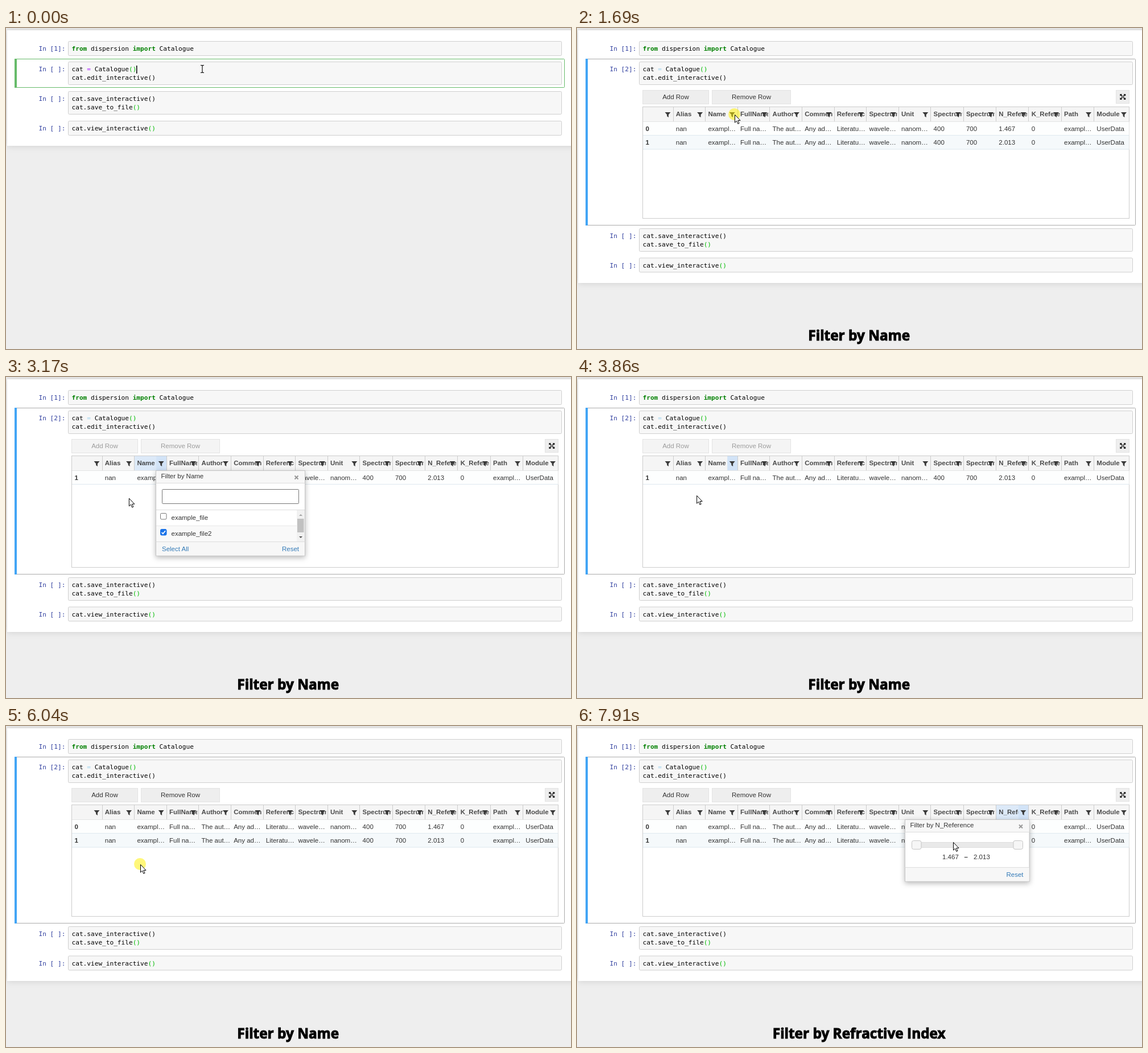
Write an HTML page that moves like this. It is 993 px wide and 564 px high and loops after 8 s.

```html
<!DOCTYPE html>
<html lang="en">
<head>
<meta charset="utf-8">
<title>Catalogue filter demo</title>
<style>
  html, body { margin: 0; width: 100%; height: 100%; overflow: hidden; background: #eee; }
  svg { display: block; }
  text { font: 11.5px "Liberation Sans", Arial, sans-serif; fill: #333; white-space: pre; }
  .b { font-weight: bold; }
  .code { font: 11.13px "DejaVu Sans Mono", monospace; fill: #000; }
  .prompt { fill: #303f9f; }
  .kw { fill: #008000; font-weight: bold; }
  .br { fill: #0b0; }
  .link { fill: #337ab7; }
  .mid { text-anchor: middle; }
  .title { font: bold 24.4px "Open Sans", "Noto Sans", sans-serif; fill: #000; stroke: #000; stroke-width: 1px; }
  .page { filter: drop-shadow(0 0 6px rgba(87, 87, 87, .22)); }
  .popup { filter: drop-shadow(0 3px 5px rgba(0, 0, 0, .28)); }
</style>
</head>
<body>
<svg id="stage" width="993" height="564" viewBox="0 0 993 564"></svg>
<script>
const LOOP = 8000;
const stage = document.getElementById('stage');

const rect = (x, y, w, h, fill, stroke = 'none', extra = '') =>
  `<rect x="${x}" y="${y}" width="${w}" height="${h}" fill="${fill}" stroke="${stroke}" ${extra}/>`;
const text = (x, y, str, cls = '', extra = '') => `<text x="${x}" y="${y}" class="${cls}" ${extra}>${str}</text>`;
const path = (d, fill, extra = '') => `<path d="${d}" fill="${fill}" ${extra}/>`;
const span = (cls, str) => `<tspan class="${cls}">${str}</tspan>`;
const at = (x, y, body) => `<g transform="translate(${x} ${y})">${body}</g>`;
const within = (t, a, b) => t >= a && t < b;
const ramp = (t, a, b) => Math.min(1, Math.max(0, (t - a) / (b - a)));

// Time, x and y of the pointer tip
const track = [
  [0, 345, 72], [450, 345, 72], [600, 356, 90], [720, 371, 108], [840, 368, 126],
  [1000, 345, 142], [1200, 290, 151], [1300, 277, 152], [2090, 277, 152],
  [2280, 278, 195], [2480, 278, 273], [2800, 278, 273], [3200, 211, 208],
  [3860, 210, 208], [3940, 219, 205], [4010, 219, 205], [4330, 282, 155],
  [4410, 277, 152], [4880, 277, 152], [5250, 274, 241], [5600, 274, 241],
  [5960, 236, 243], [6200, 236, 243], [6500, 380, 226], [7120, 785, 152],
  [7450, 785, 152], [7910, 661, 204], [LOOP, 661, 204]
];
const clicks = [[1690, 1850], [2480, 2710], [3200, 3350], [4560, 4720], [5410, 5570], [5960, 6120], [7200, 7360]];

function pointerAt(t) {
  const i = track.findIndex(k => k[0] > t);
  const [t0, x0, y0] = track[i - 1], [t1, x1, y1] = track[i];
  const p = ramp(t, t0, t1);
  return [x0 + (x1 - x0) * p, y0 + (y1 - y0) * p];
}

function cell(y, label, lines) {
  const h = lines.length * 15 + 11;
  return rect(109.5, y + .5, 867, h - 1, '#f7f7f7', '#cfcfcf', 'rx="2"') +
    text(57.5, y + 17, `In [${label}]:`, 'code prompt') +
    lines.map((line, i) => text(115.5, y + 17 + 15 * i, line, 'code')).join('');
}

// Grid columns
const names = ['', 'Alias', 'Name', 'FullName', 'Author', 'Comments', 'Reference', 'SpectrumType', 'Unit',
  'Spectrum_min', 'Spectrum_max', 'N_Reference', 'K_Reference', 'Path', 'Module'];
const values = ['', 'nan', 'exampl…', 'Full na…', 'The aut…', 'Any ad…', 'Literatu…', 'wavele…', 'nanom…',
  '400', '700', '', '0', 'exampl…', 'UserData'];
const NAME = 2, N_REF = 11;
const edge = i => i < 1 ? 115.5 : i > 14 ? 971 : 169.5 + 56.6 * (i - 1) + Math.max(0, i - 9) * .75;
const textX = i => edge(i) + (i ? 4.3 : 5);

function header(i, open, filtered) {
  const x = edge(i), end = edge(i + 1);
  const w = end - x - (open ? 19 : 3);
  return (open ? rect(x, 139, end - x, 25, '#dce9f8') : '') +
    `<svg x="${x}" y="139" width="${w}" height="25">${text(textX(i) - x, 16, names[i], 'b', 'fill-opacity=".88"')}</svg>` +
    (open || filtered ? rect(end - 18.5, 139, 18, 25, '#d2e3f7') : '') +
    at(end - 10, 152, path('M-5 -4H5L1.4 .2V5L-1.4 3V.2Z', '#3a3a3a')) +
    path(`M${Math.round(end) - .5} 139V164`, 'none', 'stroke="#ccc"');
}

function row(id, n, y, fill) {
  return rect(116, y, 854.5, 24.5, fill) + path(`M116 ${y + 24}H970.5`, 'none', 'stroke="#dfe9ef"') +
    text(textX(0), y + 16, id, 'b') +
    values.map((v, i) => text(textX(i), y + 16, i === N_REF ? n : v)).join('');
}

function button(x, w, label, off, hover) {
  return rect(x + .5, 109.5, w - 1, 24, hover ? '#dcdcdc' : off ? '#f4f4f4' : '#eee', hover ? '#cfcfcf' : '#e3e3e3') +
    text(x + w / 2, 125, label, 'mid', off ? 'fill-opacity=".45"' : '');
}

const arrows = [0, 90, 180, 270].map(a =>
  path('M-5 -5H-1.2L-2.3 -3.6L0 -1.3L-1.3 0L-3.6 -2.3L-5 -1.2Z', '#222', `transform="rotate(${a})"`)).join('');

function grid(t, open, hover) {
  const off = within(t, 2710, 5570), filtered = within(t, 2880, 5720);
  return button(115, 117, 'Add Row', off) + button(237, 139, 'Remove Row', off, hover) +
    rect(947.5, 109.5, 23, 23, '#eee', '#e3e3e3') + at(959.3, 121, arrows) +
    rect(115.5, 138.5, 855, 196, '#fff', '#ccc') + rect(116, 139, 854.5, 25, '#f5f5f5') +
    names.map((_, i) => header(i, i === open, i === NAME && filtered)).join('') +
    path('M116 164.5H970.5', 'none', 'stroke="#ccc"') +
    (filtered ? row(1, '2.013', 164.5, '#fdfefe')
      : row(0, '1.467', 164.5, '#fdfefe') + row(1, '2.013', 189, '#f5f9fb'));
}

function frame(x, w, h, title, foot) {
  const line = y => path(`M${x} ${y}.5h${w}`, 'none', 'stroke="#ddd"');
  return rect(x, 164.5, w, h, '#fff', '#c4c4c4', 'class="popup"') +
    rect(x + .5, 165, w - 1, 21, '#f7f7f7') + line(186) +
    text(x + 9, 178, title) +
    path(`M${x + w - 18} 173.5l6 6m0 -6l-6 6`, 'none', 'stroke="#999" stroke-width="2"') +
    rect(x + .5, foot, w - 1, 164 + h - foot, '#f7f7f7') + line(foot - 1) +
    text(x + w - 40.5, foot + 16, 'Reset', 'link');
}

function option(y, label, checked) {
  return rect(271.5, y + 5.5, 10.5, 10.5, checked ? '#1a73e8' : '#fff', checked ? '#1a73e8' : '#767676', 'rx="2"') +
    (checked ? path(`M273.6 ${y + 11}l2.3 2.4l4.2 -5.2`, 'none', 'stroke="#fff" stroke-width="1.7"') : '') +
    text(290.5, y + 17, label);
}

function namePopup(t) {
  const checked = within(t, 2710, 5570);
  const files = t < 4000 ? ['example_file', 'example_file2'] : ['example_file2', 'example_file'];
  return frame(263.5, 262, 149.5, 'Filter by Name', 290) +
    rect(274.5, 197.5, 240, 25, '#fff', '#767676', 'rx="1"') +
    path('M264 233.5H525', 'none', 'stroke="#ddd"') +
    rect(264, 262, 247, 27, '#f9f9f9') + path('M264 261.5H511', 'none', 'stroke="#e8e8e8"') +
    files.map((f, i) => option(234 + 28 * i, f, checked && f.endsWith('2'))).join('') +
    rect(511, 234, 14, 55, '#f1f1f1') + rect(512, 249, 11.5, 24, '#c1c1c1') +
    path('M515 244l3 -3l3 3z', '#a3a3a3') + path('M515 280l3 3l3 -3z', '#505050') +
    text(274, 306, 'Select All', 'link');
}

function indexPopup() {
  return frame(576.5, 218.5, 108.5, 'Filter by N_Reference', 249) +
    rect(596.5, 204.5, 179, 9, '#e9e9e9', '#ddd') +
    [588.5, 767].map(x => rect(x, 201.5, 16.5, 15, '#f6f6f6', '#c5c5c5', 'rx="3"')).join('') +
    text(642, 234, '1.467') + text(680.5, 234, '–', 'b') + text(697, 234, '2.013');
}

const ink = 'stroke="#000" stroke-linejoin="round"';
const beam = path('M-3 -6.5H-1L0 -5.5L1 -6.5H3M0 -5.5V5.5M-3 6.5H-1L0 5.5L1 6.5H3', 'none', 'stroke="#000" stroke-width="1.1"');
const arrow = path('M.5 .5V14.2L3.6 11.3L5.8 16.4L8 15.4L5.8 10.5H10Z', '#fff', ink);
const hand = path('M-1.5 1Q0 -1 1.3 1V6.5Q3 5.5 3.8 7.2Q5.3 6.3 6 8Q7.5 7.5 7.5 9.5V14L6 17V19.5H-2V17.5L-6 11.5Q-6 9 -3.8 10.2L-1.5 12.3Z', '#fff', ink) +
  path('M1.3 6.5V10M3.8 7.5V10.5M6 8.5V11', 'none', 'stroke="#000"');

const caption = (str, alpha) => alpha > 0 ? text(495.7, 549, str, 'title mid', `opacity="${alpha}"`) : '';

function scene(t) {
  const run = t >= 150, shown = t >= 220, drop = shown ? 241 : 0;
  const open = within(t, 1850, 3200) || within(t, 4720, 5960) ? NAME : t >= 7360 ? N_REF : -1;
  const [x, y] = pointerAt(t);
  const hover = shown && t < 1300 && within(x, 237, 376) && within(y, 109, 133);
  const pair = span('br', '()');
  const equals = `<tspan fill="${t < 1380 ? '#aa22ff' : '#9fd3ee'}">=</tspan>`;
  const accent = run ? '#42a5f5' : '#66bb6a';

  return rect(0, 0, 993, 564, '#eee') +
    rect(2, 4, 1000, 203 + drop, '#fff', 'none', 'class="page"') +
    cell(23, 1, [`${span('kw', 'from')} dispersion ${span('kw', 'import')} Catalogue`]) +
    rect(15.5, 54.5, 966, 50 + (shown ? 242 : 0), '#fff', run ? '#ababab' : accent, 'rx="1"') +
    rect(15, 54, 4, 51 + (shown ? 242 : 0), accent) +
    cell(59, shown ? 2 : run ? '*' : ' ', [`cat ${equals} Catalogue${pair}`, 'cat.edit_interactive()']) +
    (run ? '' : rect(229, 66, 1.5, 14, '#000')) +
    cell(111 + drop, ' ', ['cat.save_interactive()', `cat.save_to_file${pair}`]) +
    cell(163 + drop - (shown ? .5 : 0), ' ', [`cat.view_interactive${pair}`]) +
    (shown ? grid(t, open, hover) : '') +
    (open === NAME ? namePopup(t) : open === N_REF ? indexPopup() : '') +
    caption('Filter by Name', ramp(t, 1380, 1690) - ramp(t, 6200, 6500)) +
    caption('Filter by Refractive Index', ramp(t, 6650, 7000)) +
    (clicks.some(c => within(t, ...c)) ? `<circle cx="${x - .5}" cy="${y - .5}" r="10.5" fill="#fff000" fill-opacity=".52"/>` : '') +
    at(x, y, hover ? hand : y < 100 ? beam : arrow);
}

function draw(now) {
  stage.innerHTML = scene(now % LOOP);
  requestAnimationFrame(draw);
}
draw(performance.now());
</script>
</body>
</html>
```
